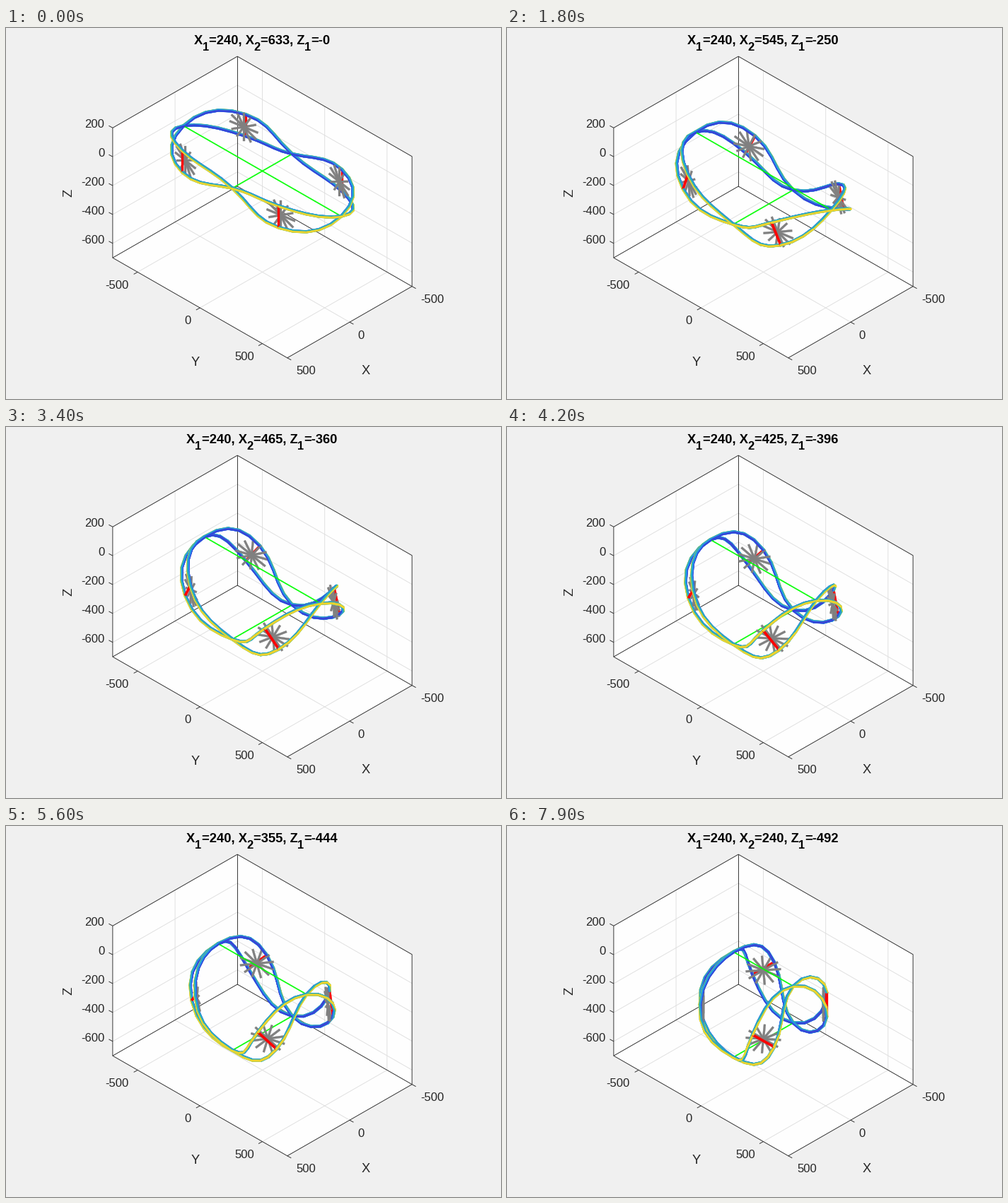
Recreate the animation shown at these times as a matplotlib script. Size 700 by 525 pixels, loop 8000 ms.

```python
import numpy as np
import matplotlib.pyplot as plt
from matplotlib.animation import FuncAnimation
from matplotlib.collections import LineCollection, PolyCollection

W, H, DPI = 700, 525, 100
FRAMES, INTERVAL = 80, 100
PX = 72 / DPI  # points per pixel
X1 = 240
X2_MAX, X2_MIN = 633, 240
BAR_HALF, WHEEL_R, WHEEL_INSET, TUBE_R = 75, 100, 20, 8.5
SPOKES, STEPS, FULLNESS = 12, 5, 1.22
GRAY, RED, GREEN = "#808080", "#ff0000", "#00ff00"
# Colours around the rail, from its outer side over the top to its inner side.
OUTER_TO_INNER = ["#f6d826", "#30b8b0", "#2297e6", "#3340dc"]
FACET_COLORS = OUTER_TO_INNER + OUTER_TO_INNER[::-1]
INK = "#262626"

ELEV = np.radians(35)
SCALE = 0.2494
VIEW = np.array([np.cos(ELEV) / np.sqrt(2), np.cos(ELEV) / np.sqrt(2), np.sin(ELEV)])
SIDE = SCALE / np.sqrt(2)
TO_SCREEN = np.array([[-SIDE, SIDE * np.sin(ELEV)],
                      [SIDE, SIDE * np.sin(ELEV)],
                      [0, -SCALE * np.cos(ELEV)]])
ORIGIN = np.array([362.5, 202.4])

# Sink depth as a smooth function of how far the ring has closed.
CLOSING = np.array([0, 48, 128, 208, 278, 328, 393])
SINK = np.array([0, 161, 313, 396, 444, 470, 492])
SINK_FIT = np.polyfit(CLOSING / 393, SINK, 6)


def project(points):
    return np.asarray(points, float) @ TO_SCREEN + ORIGIN


def unit(v):
    return v / np.linalg.norm(v, axis=-1, keepdims=True)


def pose(frame):
    x2 = X2_MAX if frame == 0 else 635 - 5 * frame
    sink = 0 if frame == 0 else np.polyval(SINK_FIT, (X2_MAX - x2) / 393)
    return x2, -float(sink)


def closed_spline(knots):
    """Periodic cubic curve with slightly fuller bends: points and tangents."""
    eye = np.eye(len(knots))
    system = 4 * eye + np.roll(eye, 1, 0) + np.roll(eye, -1, 0)
    ahead = np.roll(knots, -1, 0)
    slope = FULLNESS * np.linalg.solve(system, 3 * (ahead - np.roll(knots, 1, 0)))
    next_slope = np.roll(slope, -1, 0)
    t = (np.arange(STEPS) / STEPS)[None, :, None]
    p, q, m, k = (a[:, None, :] for a in (knots, ahead, slope, next_slope))
    pos = ((2*t**3 - 3*t**2 + 1) * p + (t**3 - 2*t**2 + t) * m
           + (3*t**2 - 2*t**3) * q + (t**3 - t**2) * k)
    tan = ((6*t**2 - 6*t) * (p - q) + (3*t**2 - 4*t + 1) * m + (3*t**2 - 2*t) * k)
    return pos.reshape(-1, 3), unit(tan.reshape(-1, 3))


class Scene:
    """Collects flat pieces and orders them from far to near."""

    def __init__(self):
        self.pieces = []

    def quad(self, corners, color):
        corners = np.asarray(corners)
        self.pieces.append((corners.mean(0) @ VIEW, project(corners), color))

    def line(self, start, end, width, color, parts=1):
        ends = np.linspace(start, end, parts + 1)
        for a, b in zip(ends[:-1], ends[1:]):
            pa, pb = project([a, b])
            d = pb - pa
            length = max(np.hypot(*d), 1e-6)
            off = np.array([-d[1], d[0]]) / length * width / 2
            shape = np.array([pa + off, pb + off, pb - off, pa - off])
            self.pieces.append(((a + b) / 2 @ VIEW, shape, color))

    def tube(self, knots):
        pos, tan = closed_spline(knots)
        outward = unit(np.cross(tan, [0, 0, 1]))
        up = np.cross(outward, tan)
        rings = [pos + TUBE_R * (np.cos(angle) * outward + np.sin(angle) * up)
                 for angle in np.linspace(0, 2 * np.pi, len(FACET_COLORS) + 1)]
        for lo, hi, color in zip(rings[:-1], rings[1:], FACET_COLORS):
            for a, b, c, d in zip(lo, np.roll(lo, -1, 0), np.roll(hi, -1, 0), hi):
                self.quad([a, b, c, d], color)

    def sorted(self):
        self.pieces.sort(key=lambda piece: piece[0])
        return [p[1] for p in self.pieces], [p[2] for p in self.pieces]


def build(x2, z1):
    scene = Scene()
    u = (x2 - X2_MIN) / (X2_MAX - X2_MIN)
    bulge = 52 * u**2 * (1 - u)
    mid = np.array([254 + bulge, 254 + 132 * u + bulge, z1 / 2])
    heading = np.radians(45 - 36 * u)
    normal = np.array([np.cos(heading), np.sin(heading), 0])
    chord = np.array([-X1, x2, -z1])
    along = unit(chord - (chord @ normal) * normal)
    bar = np.cross(normal, along)

    corners = [np.array(s) for s in ((1, 1, 1), (-1, 1, 1), (-1, -1, 1), (1, -1, 1))]
    nodes = np.array([[X1, 0, z1], [0, x2, 0], [-X1, 0, z1], [0, -x2, 0]], float)
    for side in (1, -1):
        knots = []
        for i, (node, s) in enumerate(zip(nodes, corners)):
            knots += [node, s * (mid + side * (-1) ** i * BAR_HALF * bar)]
        scene.tube(np.array(knots))

    hub = mid - WHEEL_INSET * normal
    for s in corners:
        scene.line(s * (mid - BAR_HALF * bar), s * (mid + BAR_HALF * bar), 3.4, RED, 4)
        for angle in np.arange(SPOKES) * 2 * np.pi / SPOKES:
            tip = hub + WHEEL_R * (np.cos(angle) * along + np.sin(angle) * bar)
            scene.line(s * hub, s * tip, 2.9, GRAY, 2)

    scene.line(nodes[0], nodes[2], 1.3, GREEN, 16)
    scene.line(nodes[1], nodes[3], 1.3, GREEN, 24)
    return scene.sorted()


fig = plt.figure(figsize=(W / DPI, H / DPI), dpi=DPI, facecolor="#f0f0f0")
ax = fig.add_axes([0, 0, 1, 1])
ax.set(xlim=(0, W), ylim=(H, 0))
ax.axis("off")


def label(x, y, text, size=16.67, **style):
    options = dict(ha="center", va="center", color=INK, family="Liberation Sans",
                   fontsize=size * PX)
    return ax.text(x, y, text, **{**options, **style})


def draw_axes():
    xa, xb, ya, yb, za, zb = -500, 500, -700, 700, -700, 200
    outline = [(xb, ya, zb), (xa, ya, zb), (xa, yb, zb),
               (xa, yb, za), (xb, yb, za), (xb, ya, za)]
    ax.fill(*project(outline).T, color="#fefefe", lw=0, zorder=0)

    grid = [[(0, ya, zb), (0, ya, za), (0, yb, za)]]
    grid += [[(xa, y, zb), (xa, y, za), (xb, y, za)] for y in (-500, 0, 500)]
    grid += [[(xb, ya, z), (xa, ya, z), (xa, yb, z)] for z in (0, -200, -400, -600)]
    ax.add_collection(LineCollection([project(g) for g in grid], colors="#dedede",
                                     linewidths=0.9 * PX, zorder=1))

    edges = [project(outline + outline[:1])]
    back = (xa, ya, za)
    edges += [project([back, p]) for p in ((xa, ya, zb), (xb, ya, za), (xa, yb, za))]

    def tick(point, dx, dy):
        p = project(point)
        edges.append(np.array([p, p + (dx, dy)]))
        return p

    for z in (200, 0, -200, -400, -600):
        _, y = tick((xb, ya, z), -5.5, -3)
        label(139.5, y - 6, str(z), ha="right", va="center_baseline")
    for y, text_x in ((-500, 157), (0, 257), (500, 337)):
        p = tick((xb, y, za), -5.5, 3)
        label(text_x, p[1] + 17.5, str(y), va="center_baseline")
    for x, text_x in ((500, 424), (0, 502.5), (-500, 602.5)):
        p = tick((x, yb, za), 5.5, 3)
        label(text_x, p[1] + 17.5, str(x), va="center_baseline")
    ax.add_collection(LineCollection(edges, colors=INK, linewidths=0.9 * PX, zorder=2))

    label(509, 485, "X", 18.33)
    label(268, 473, "Y", 18.33)
    label(89, 233, "Z", 18.33, rotation=90)


# Advance widths of the bold face, in em.
ADVANCE = {"X": 0.667, "Z": 0.611, "=": 0.584, ",": 0.278, " ": 0.278, "-": 0.333}
TITLE_SIZE, SUB_SIZE = 18.33, 16.5


def title_piece(size):
    return label(0, 0, "", size, color="black", weight="bold", ha="left", va="baseline")


def set_title(x2, z1):
    parts = ["X", "1", f"={X1}, X", "2", f"={x2}, Z", "1", f"={z1:.0f}"]
    sizes = [SUB_SIZE if i % 2 else TITLE_SIZE for i in range(len(parts))]
    widths = [size * sum(ADVANCE.get(c, 0.556) for c in part)
              for part, size in zip(parts, sizes)]
    x = 362 - sum(widths) / 2
    for i, (artist, part, width) in enumerate(zip(title, parts, widths)):
        artist.set_text(part)
        artist.set_position((x, 32 if i % 2 else 23))
        x += width


draw_axes()
title = [title_piece(SUB_SIZE if i % 2 else TITLE_SIZE) for i in range(7)]
ring = PolyCollection([], linewidths=0.25, zorder=3)
ax.add_collection(ring, autolim=False)


def update(frame):
    x2, z1 = pose(frame)
    shapes, colors = build(x2, z1)
    ring.set_verts(shapes)
    ring.set_facecolor(colors)
    ring.set_edgecolor(colors)
    set_title(x2, z1)
    return [ring, *title]


anim = FuncAnimation(fig, update, frames=FRAMES, interval=INTERVAL,
                     repeat=True, repeat_delay=0, blit=False)
plt.show()
```
